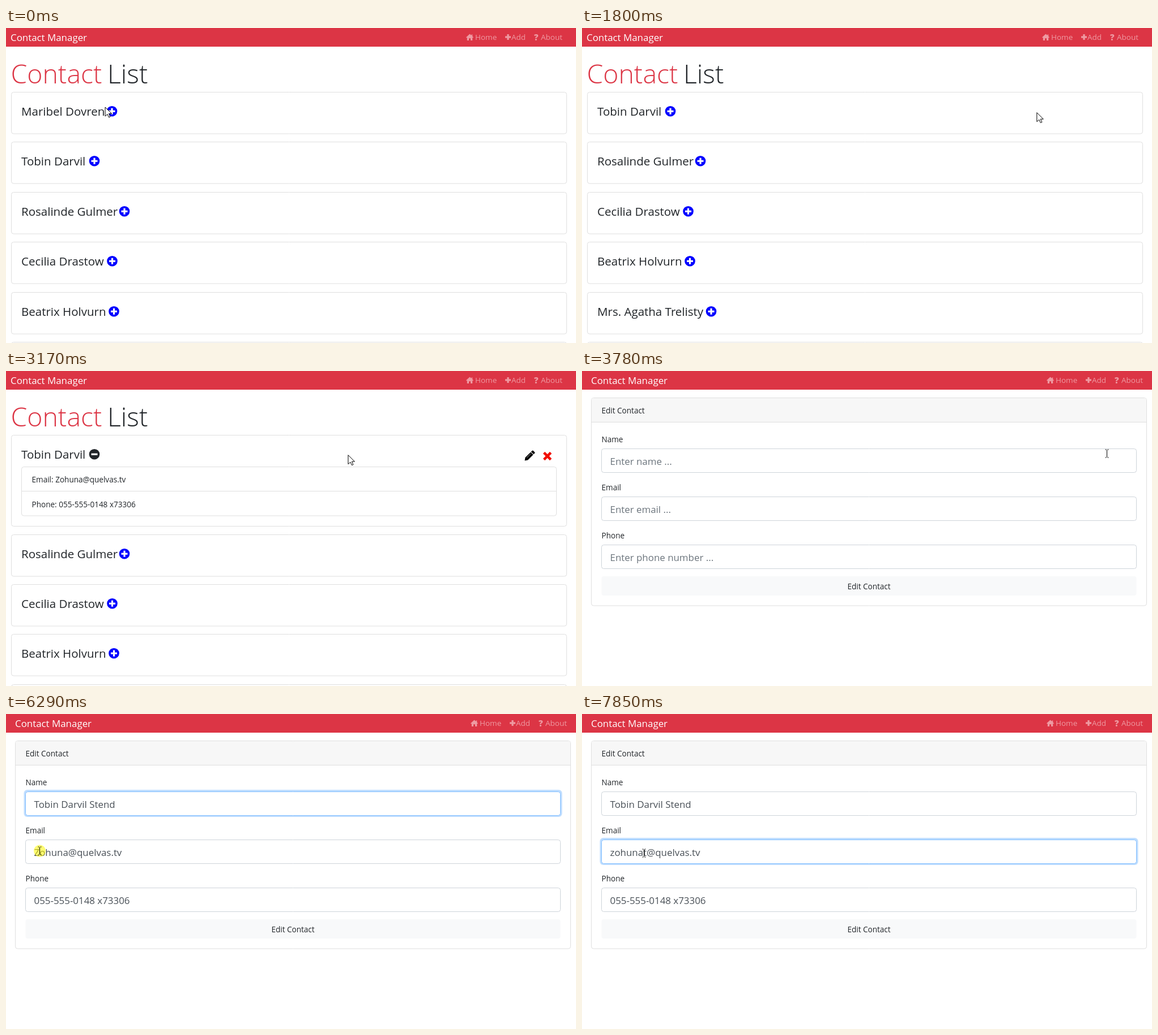
These frames come from a looping animation (1006 px wide and 557 px high, 8 s). An HTML page with a canvas:

```html
<!DOCTYPE html>
<html lang="en">
<head>
<meta charset="utf-8">
<title>Contact Manager</title>
<style>
  html, body { margin: 0; width: 100%; height: 100%; overflow: hidden; background: #fff; }
  canvas { display: block; }
</style>
</head>
<body>
<canvas id="stage" width="1006" height="557"></canvas>
<script>
const ctx = document.getElementById('stage').getContext('2d');
const LOOP = 8000, FONT = '"Open Sans", "Noto Sans", sans-serif';
const RED = '#dc3545', DARK = '#212529', LINK = '#ee9aa2', BORDER = '#dfdfdf';
const SMALL = 13.55, FIELD = 16.9, TITLE = 46.4;

// name and centre of the toggle icon
const contacts = [
  ['Maribel Dovren', 187], ['Tobin Darvil', 156], ['Rosalinde Gulmer', 209],
  ['Cecilia Drastow', 187.5], ['Beatrix Holvurn', 190.5], ['Mrs. Agatha Trelisty', 228], ['', 0],
];
const details = [
  ['Lenient@trelv.biz', '1-555-014-0127 x30918'],
  ['Zohuna@quelvas.tv', '055-555-0148 x73306'],
];

// pointer moves: start, end, steps, x, y, shape on arrival, shape on the way
const moves = [
  [0, 0, 1, 175, 140, 'arrow'],
  [320, 390, 2, 184.5, 146.5, 'hand', 'hand'],
  [1010, 1010, 1, 962.5, 150.5, 'hand'],
  [1710, 2170, 7, 157, 146, 'hand', 'arrow'],
  [2790, 3400, 9, 923.5, 150.5, 'hand', 'arrow'],
  [3780, 3780, 1, 926.5, 146, 'beam'],
  [4080, 4147, 2, 797.5, 159, 'beam', 'beam'],
  [6060, 6060, 1, 59.5, 242, 'beam'],
  [7690, 7770, 2, 109.5, 246, 'beam', 'beam'],
];
const clicks = [[700, 930], [1170, 1710], [2410, 2640], [3550, 3780], [4147, 4280], [6290, 6580]];
const caretOn = [[4280, 5050], [5140, 5600], [5770, 6290], [6440, 6910], [7290, 7850]];
const suffix = ' Stend', suffixTimes = [4530, 4750, 5140, 5360, 5770, 6060];

const pointers = {
  arrow: new Path2D('M0 0V16L4 12.5L6.5 18L9 17L6.5 11.5H11.5Z'),
  hand: new Path2D('M0 1Q0 -1 1.5 -1Q3 -1 3 1V6Q5 5 5.7 6.6Q7.5 6 8.2 7.6Q10 7 10 9.5V14' +
    'Q10 16 8.5 19.5H1.5L-3.5 12.5Q-5 10 -3.5 9.5Q-2 9.5 0 11.5Z'),
  beam: new Path2D('M-3 -7H-1M1 -7H3M0 -6.5V6.5M-3 7H-1M1 7H3'),
};
const knuckles = new Path2D('M3 6V10M5.7 7V10M8.2 8V10');
const house = new Path2D('M0 6L6.5 0L9.5 2.7V1H11.2V4.2L13 6L12 7L11.2 6.3V11.5H8V7.8H5V11.5H1.8V6.3L1 7Z');
const pencil = new Path2D('M-12 0L-7.5 -3.2H6V3.2H-7.5ZM7 -3.2H9.5Q11 -3.2 11 -2V2Q11 3.2 9.5 3.2H7Z');

const within = (t, spans) => spans.some(([a, b]) => t >= a && t < b);
const clamp = v => Math.max(0, Math.min(1, v));

function text(str, x, y, size, color = DARK, weight = 400, align = 'left') {
  ctx.font = `${weight} ${size}px ${FONT}`;
  ctx.fillStyle = color;
  ctx.textAlign = align;
  ctx.fillText(str, x, y);
  return ctx.measureText(str).width;
}

function box(x, y, w, h, fill, stroke, r = 4) {
  ctx.beginPath();
  ctx.roundRect(x, y, w, h, r);
  if (fill) { ctx.fillStyle = fill; ctx.fill(); }
  if (stroke) { ctx.strokeStyle = stroke; ctx.lineWidth = 1; ctx.stroke(); }
}

function rect(x, y, w, h, color) {
  ctx.fillStyle = color;
  ctx.fillRect(x, y, w, h);
}

function disc(x, y, r, color) {
  ctx.fillStyle = color;
  ctx.beginPath();
  ctx.arc(x, y, r, 0, 7);
  ctx.fill();
}

function at(x, y, angle, draw) {
  ctx.save();
  ctx.translate(x, y);
  ctx.rotate(angle);
  draw();
  ctx.restore();
}

function plus(x, y, len, thick, color) {
  rect(x - len / 2, y - thick / 2, len, thick, color);
  rect(x - thick / 2, y - len / 2, thick, len, color);
}

function navbar(dx) {
  rect(0, 0, 1006, 33, RED);
  text('Contact Manager', 8 + dx, 23, FIELD, '#fff');
  at(812 + dx, 10.5, 0, () => { ctx.fillStyle = LINK; ctx.fill(house); });
  text('Home', 828 + dx, 21, 13.5, LINK);
  plus(886 + dx, 16, 10, 3.2, LINK);
  text('Add', 892 + dx, 21, 13.5, LINK);
  text('?', 932 + dx, 21.5, 15, LINK, 800);
  text('About', 944 + dx, 21, 13.5, LINK);
}

function openDetails([email, phone]) {
  box(27.5, 169.5, 944, 86.5, null, BORDER);
  rect(28, 212, 943, 1, BORDER);
  text('Email: ' + email, 45.5, 197, SMALL);
  text('Phone: ' + phone, 45.5, 241, SMALL);
  at(924, 150, -Math.PI / 4, () => {
    ctx.fillStyle = '#000';
    ctx.fill(pencil);
    rect(-6, -1.6, 10, 1, '#777');
  });
  at(955.5, 150.5, Math.PI / 4, () => plus(0, 0, 17, 4.6, '#f10d00'));
}

function listPage(t) {
  const first = t < 1710 ? 0 : 1;
  const open = within(t, [[930, 1710], [2640, 3780]]);
  navbar(0);
  const w = text('Contact', 8.5, 98, TITLE, RED, 300);
  text('List', 18 + w, 98, TITLE, DARK, 300);
  contacts.slice(first).forEach(([name, iconX], i) => {
    const expanded = open && i === 0;
    const y = Math.round(113 + i * 88.4 + (open && i ? 87.2 : 0));
    const iconY = y + 34.2;
    box(9.5, y + 0.5, 980, expanded ? 161 : 73.5, '#fff', BORDER);
    text(name, 27, y + 42, 20.5);
    disc(iconX, iconY, 9.3, expanded ? DARK : '#00f');
    if (expanded) {
      rect(iconX - 5.5, iconY - 1.6, 11, 3.2, '#fff');
      openDetails(details[first]);
    } else plus(iconX, iconY, 11, 3.2, '#fff');
  });
}

function field(label, y, value, hint, focus, caret) {
  text(label, 34.5, y - 11.5, SMALL);
  if (focus > 0) {
    box(31.5, y - 3, 950, 48, `rgba(0,123,255,${0.25 * focus})`, null, 6);
  }
  box(34.5, y + 0.5, 944, 42, '#fff', focus > 0.5 ? '#80bdff' : '#ced4da');
  text(value || hint, 49.5, y + 29, FIELD, value ? '#495057' : '#6c757d');
  if (caret >= 0) {
    const x = 49.5 + ctx.measureText(value.slice(0, caret)).width;
    rect(Math.round(x), y + 10, 1, 24, '#333');
  }
}

function emailState(t) {
  const email = details[1][0], tail = email.slice(1), low = email.toLowerCase();
  if (t < 7290) return [email, 1];
  if (t < 7610) return [tail, 0];
  if (t < 7850) return [low, t < 7770 ? 1 : 6];
  return [low.replace('@', 't@'), 7];
}

function editPage(t) {
  const filled = t >= 3850, onEmail = t >= 6290, caret = within(t, caretOn);
  const name = filled ? contacts[1][0] + suffix.slice(0, suffixTimes.filter(s => t >= s).length) : '';
  const [email, emailCaret] = emailState(t);
  const nameFocus = onEmail ? 1 - clamp((t - 6290) / 150) : clamp((t - 4100) / 150);
  navbar(8);
  box(16.5, 47.5, 980, 367.5, '#fff', BORDER);
  box(17, 48, 979, 43, '#f7f7f7', null, [3, 3, 0, 0]);
  rect(17, 90, 979, 1, BORDER);
  text('Edit Contact', 34.5, 75, SMALL);
  field('Name', 137, name, 'Enter name ...', nameFocus, caret && !onEmail ? name.length : -1);
  field('Email', 222, filled ? email : '', 'Enter email ...', clamp((t - 6290) / 150),
    caret && onEmail ? emailCaret : -1);
  field('Phone', 307, filled ? details[1][1] : '', 'Enter phone number ...', 0, -1);
  box(34.5, 363, 944, 34, '#f8f9fa');
  text('Edit Contact', 506.5, 386, SMALL, DARK, 400, 'center');
}

function pointerAt(t) {
  const i = moves.findLastIndex(m => t >= m[0]);
  const [start, end, steps, x, y, shape, transit] = moves[i];
  if (t >= end) return { x, y, shape };
  const from = moves[i - 1];
  const p = (Math.floor((t - start) / (end - start) * (steps - 1)) + 1) / steps;
  const e = p * p * (3 - 2 * p);
  return { x: from[3] + (x - from[3]) * e, y: from[4] + (y - from[4]) * e, shape: transit };
}

function drawPointer(t) {
  const { x, y, shape } = pointerAt(t);
  if (within(t, clicks)) disc(x, y, 10.5, 'rgba(255,250,0,.55)');
  at(x, y, 0, () => {
    ctx.lineWidth = 1;
    ctx.strokeStyle = '#000';
    ctx.fillStyle = '#fff';
    if (shape !== 'beam') ctx.fill(pointers[shape]);
    ctx.stroke(pointers[shape]);
    if (shape === 'hand') ctx.stroke(knuckles);
  });
}

function frame() {
  const t = performance.now() % LOOP;
  rect(0, 0, 1006, 557, '#fff');
  (t < 3780 ? listPage : editPage)(t);
  drawPointer(t);
  requestAnimationFrame(frame);
}
frame();
</script>
</body>
</html>
```
